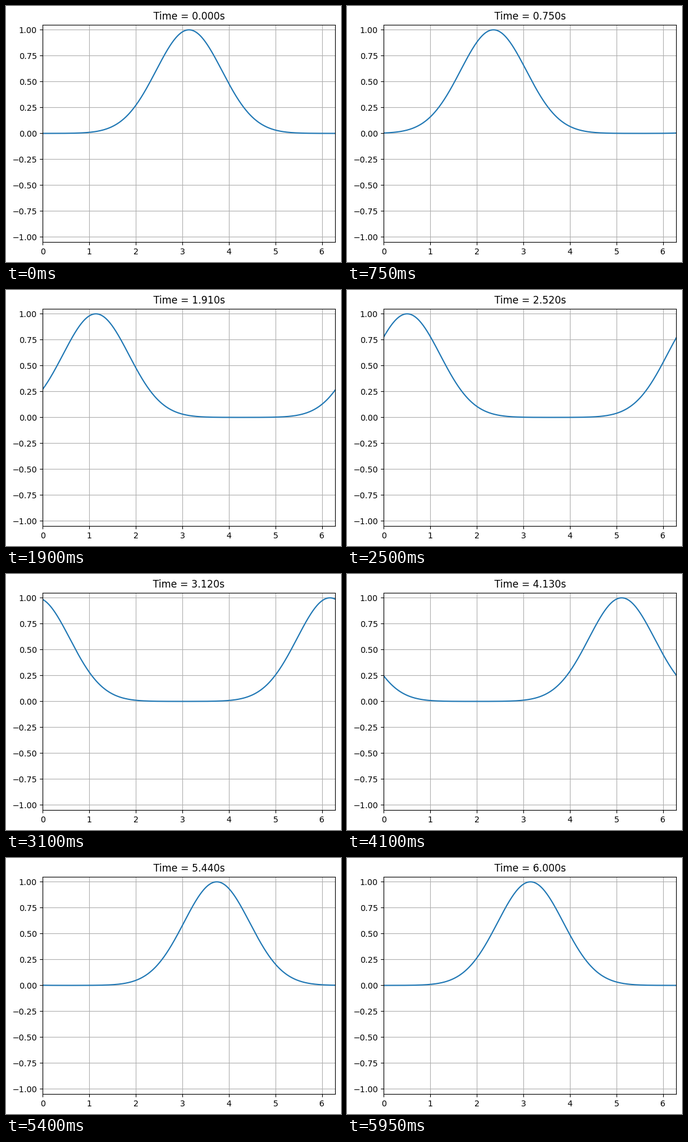
These frames come from a looping animation (568 px wide and 435 px high, 6 s). A matplotlib script:

```python
import numpy as np
import matplotlib.pyplot as plt
from matplotlib.animation import FuncAnimation

W, H, DPI = 568, 435, 100
FRAMES, INTERVAL = 120, 50
STEPS, DT = 600, 0.01

# Gaussian pulse on a periodic grid, moving left one cell per time step
x = np.linspace(0, 2 * np.pi, STEPS + 1)
pulse = np.exp(-(x - np.pi) ** 2)

# The small excess keeps the pixel size from being truncated downwards
fig = plt.figure(figsize=((W + 0.001) / DPI, (H + 0.001) / DPI), dpi=DPI,
                 facecolor="white")
ax = fig.add_axes([62.28 / W, 33.72 / H, 496 / W, 369.6 / H])
ax.set_xlim(0, 2 * np.pi)
ax.set_ylim(-1.05, 1.05)
ax.grid(True)
line, = ax.plot(x, pulse)
title = ax.set_title("Time = 0.000s")


def update(frame):
    step = STEPS * frame // (FRAMES - 1)
    line.set_ydata(np.roll(pulse, -step))
    title.set_text(f"Time = {step * DT:.3f}s")
    return line, title


anim = FuncAnimation(fig, update, frames=FRAMES, interval=INTERVAL,
                     repeat=True, repeat_delay=0, blit=False)
plt.show()
```
